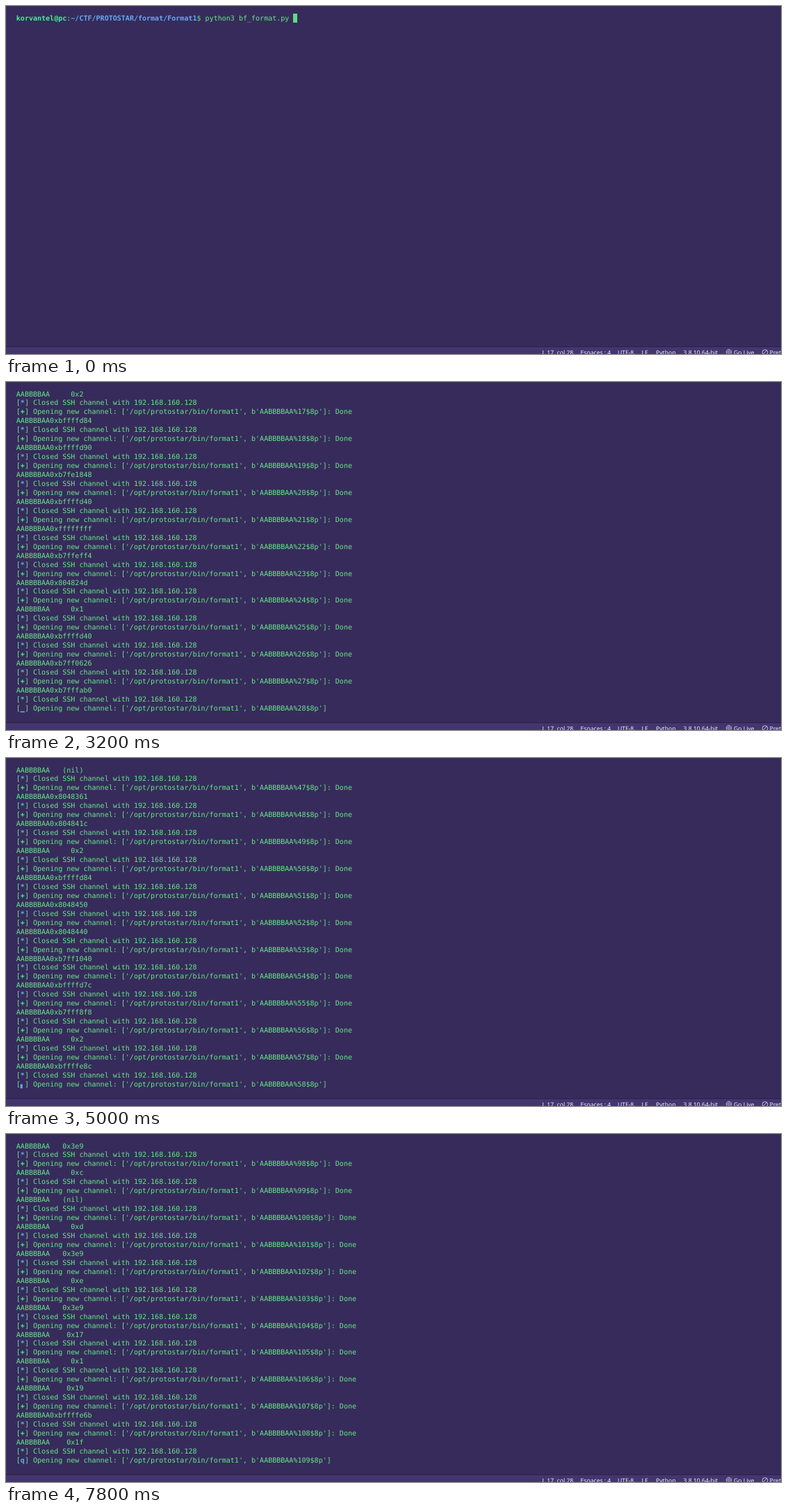
Write an HTML page that moves like this. It is 1115x502 px and loops after 8 s.

```html
<!DOCTYPE html>
<html lang="en">
<head>
<meta charset="utf-8">
<title>Terminal session</title>
<style>
  html, body { margin: 0; width: 100%; height: 100%; overflow: hidden; background: #372b5b; }
  #screen {
    position: absolute; left: 14.8px; top: 12.5px; margin: 0;
    font: 10.04px/12.96px "DejaVu Sans Mono", monospace;
    text-rendering: geometricPrecision; color: #66e888;
  }
  #screen b { color: #42f094; }
  #screen .blue { color: #66a8f6; }
  #screen i { font-style: normal; color: #de7d86; }
  #cursor { position: absolute; top: -1.5px; width: 6.04px; height: 13px; background: #5fdb84; }
  svg { position: absolute; left: 0; top: 0; }
  svg text { font: 8.6px "Noto Sans", sans-serif; fill: #f0ecfa; text-rendering: geometricPrecision; }
</style>
</head>
<body>
<pre id="screen"></pre>
<svg width="1115" height="502">
  <path d="M.5 0V491" stroke="#43366f"/>
  <path d="M0 492h1115v10H0z" fill="#43366f"/>
  <path d="M0 491.5h1115" stroke="#2b2148"/>
  <g id="labels"></g>
  <g fill="none" stroke="#e4e0f0" stroke-width=".8">
    <path d="M1038 502.3a3.7 3.7 0 1 1 4 0M1038.6 500.6a1.9 1.9 0 1 1 2.8 0M1040 499v3"/>
    <circle cx="1092" cy="499.5" r="3.8"/>
    <path d="M1089.4 502.2l5.2-5.4"/>
  </g>
</svg>
<script>
const LOOP = 8000, ROWS = 36;
const HOST = '192.168.160.128';

// Stack words printed by %1$8p, %2$8p, ... ("-" is a null pointer)
const stack = `804960c bffffcd8 8048469 b7fd8304 b7fd7ff4 bffffcd8 8048435 bffffe9d
  b7ff1040 804845b b7fd7ff4 8048450 - bffffd58 b7eadc76 2 bffffd84 bffffd90
  b7fe1848 bffffd40 ffffffff b7ffeff4 804824d 1 bffffd40 b7ff0626 b7fffab0
  b7fe1b28 b7fd7ff4 - - bffffd58 d5d6e10f ff8a771f - - - 2 8048340 -
  b7ff6210 b7eadb9b b7ffeff4 2 8048340 - 8048361 804841c 2 bffffd84 8048450
  8048440 b7ff1040 bffffd7c b7fff8f8 2 bffffe8c bffffe97 - bffffeac bffffed8
  bffffee2 bffffef6 bfffff08 bfffff18 bfffff2b bfffff38 bfffff43 bfffff7d
  bfffff8e bfffff9c bfffffab - 20 b7fe2414 21 b7fe2000 10 178bfbff 6 1000
  11 64 3 8048034 4 20 5 7 7 b7fe3000 8 - 9 8048340 b 3e9 c - d 3e9 e 3e9
  17 1 19 bffffe6b 1f -`.split(/\s+/);

const pointer = word => (word === '-' ? '(nil)' : '0x' + word).padStart(8);
const done = text => `[<b>+</b>] ${text}: Done`;
const note = text => `[<b class="blue">*</b>] ${text}`;
const info = (label, value) => '    ' + label.padEnd(10) + value;

const lines = [
  '<b>korvantel@pc</b>:<b class="blue">~/CTF/PROTOSTAR/format/Format1</b>$ python3 bf_format.py ',
  done(`Connecting to ${HOST} on port 22`),
  note(`demo@${HOST}:`),
  info('Distro', 'Unknown Unknown'),
  info('OS:', 'Unknown'),
  info('Arch:', 'Unknown'),
  info('Version:', '0.0.0'),
  info('ASLR:', '<i>Disabled</i>'),
  info('Note:', '<i>Susceptible to ASLR ulimit trick (CVE-2016-3672)</i>')
];
for (let n = 0; n <= stack.length; n++) {
  lines.push(
    done(`Opening new channel: ['/opt/protostar/bin/format1', b'AABBBBAA%${n}$8p']`),
    'AABBBBAA' + (n ? pointer(stack[n - 1]) : '%0$8p'),
    note(`Closed SSH channel with ${HOST}`)
  );
}

// Moments of change in tenths of a second
const times = `0 12 15 16 17 18 20 22 23 24 25 26 29 30
  32 34 35 37 38 39 40 41 42 43 44 45 46 47 48 50 51 52 54 55 57 58
  62 63 64 66 68 69 70 71 72 73 75 77 78`.split(/\s+/).map(t => t * 100);

// Per moment: + finished, = value shown, ~ value on the spare row, : channel closed, else a spinner
const marks = [...'+▖◢+▁|=◢' + '+◢:▁+▁' + '▁:o+▖:/+=◢+|+▖▁▖◢-++~~' + '▖:+++d+q+d:qq'];
const extraLines = { '=': 1, '~': 1, ':': 2 };

// Line counts while channels open at a steady pace
const run = (first, step, count) =>
  Array.from({ length: count }, (_, k) => 10 + 3 * Math.round(first + k * step));
const counts = [1, 2, 2, 9, 10, 13, 22, 31,
  ...run(8, 10 / 3, 6), ...run(28, 2, 22), ...run(73, 3, 13)];

function view(index) {
  const mark = marks[index];
  const end = counts[index] + (extraLines[mark] || 0);
  const rows = lines.slice(Math.max(0, end - ROWS - (mark === '~')), end);
  if (!'+=~:'.includes(mark)) {
    const last = rows.length - 1;
    rows[last] = rows[last].replace('<b>+</b>', `<b class="blue">${mark}</b>`).replace(': Done', '');
  }
  return rows.join('\n') + (index ? '' : '<span id="cursor"></span>');
}

const labels = [[771.5, 'L 17, col 28'], [826.5, 'Espaces : 4'], [880, 'UTF-8'], [914.5, 'LF'],
  [935, 'Python'], [974.5, '3.8.10 64-bit'], [1047, 'Go Live'], [1098.5, 'Prettier']];
document.getElementById('labels').innerHTML =
  labels.map(([x, text]) => `<text x="${x}" y="502.8">${text}</text>`).join('');

const screenText = document.getElementById('screen');
let shown = -1;
function draw() {
  const now = performance.now() % LOOP;
  const index = times.filter(t => t <= now).length - 1;
  if (index !== shown) screenText.innerHTML = view(shown = index);
  requestAnimationFrame(draw);
}
draw();
</script>
</body>
</html>
```
